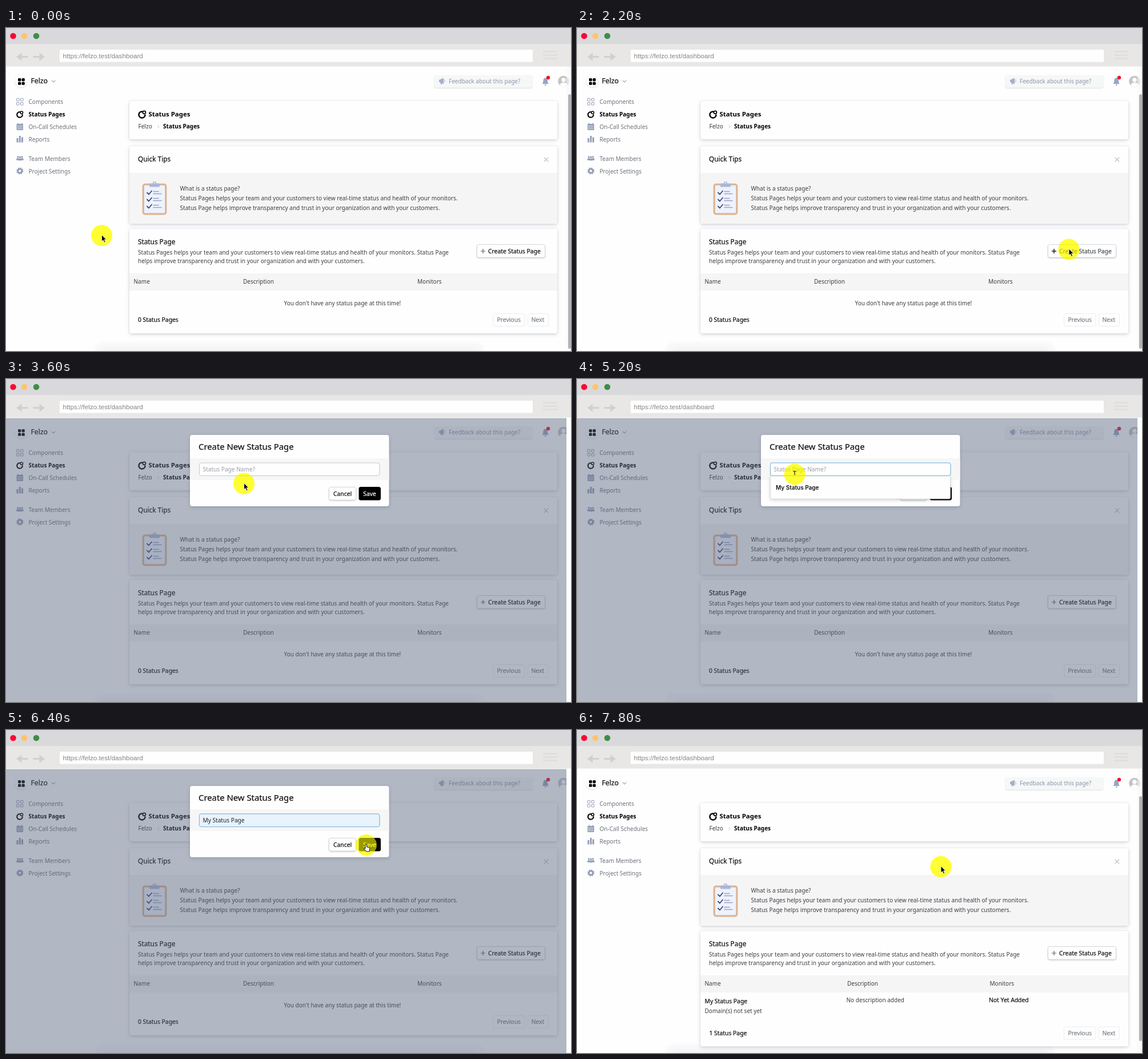
An HTML page for the animation above (8 s loop, 989 by 566 pixels).

```html
<!DOCTYPE html>
<html lang="en">
<head>
<meta charset="utf-8">
<title>Status pages</title>
<style>
html, body { margin: 0; width: 100%; height: 100%; overflow: hidden; background: #fefefe; }
svg { display: block; width: 100%; height: 100%; }
text { font: 10.04px "Noto Sans", sans-serif; fill: #3b3d44; white-space: pre; }
.side text { fill: #6c717c; }
.mid { font-size: 10.35px; color: #111; fill: currentColor; stroke: currentColor; stroke-width: .22; }
.bold, .side .bold { font-weight: 600; fill: #000; }
.head { font-size: 11.8px; }
.card { fill: #fefefe; filter: drop-shadow(0 2px 3px #3c425730) drop-shadow(0 0 1px #3c425720); }
.band { fill: #f5f5f5; }
.btn { fill: #fefefe; stroke: #d5d8df; filter: drop-shadow(0 1px 1px #0003); }
.pale { fill: #fefefe; stroke: #ebecef; }
.line { fill: none; stroke-linecap: round; stroke-linejoin: round; }
</style>
</head>
<body>
<svg viewBox="0 0 989 566">
  <defs>
    <g id="ring" class="line" stroke="#000">
      <path d="M0 -4.4A4.8 4.8 0 1 0 4.8 .8" stroke-width="2.2"/>
      <circle cx="3.4" cy="-3.2" r="2.2" stroke-width="1.5"/>
    </g>
    <g id="tick" class="line">
      <path d="M247 0l3 3 5-6" stroke="#3d4a70" stroke-width="1.8"/>
      <path d="M258-2h9M258 2h14" stroke="#98a4c4" stroke-width="1.6"/>
    </g>
    <g id="person"><circle cy="-2.6" r="1.7"/><path d="M-2.7 3.2V1.6Q-2.7-.4 0-.4T2.7 1.6V3.2z"/></g>
    <filter id="blur"><feGaussianBlur stdDeviation="2"/></filter>
  </defs>

  <rect width="989" height="566" fill="#fefefe"/>

  <!-- page -->
  <g filter="url(#blur)">
    <rect x="156" y="551" width="680" height="40" rx="14" fill="#f8f8fa"/>
    <rect x="168" y="560" width="656" height="30" rx="8" fill="#f4f4f4"/>
  </g>
  <circle cx="26.5" cy="93.5" r="10.5" fill="#fefefe" style="filter:drop-shadow(0 1px 1px #0002)"/>
  <rect x="21" y="88" width="5.3" height="5.3" rx="1.5"/><rect x="27.5" y="88" width="5.3" height="5.3" rx="1.5"/>
  <rect x="21" y="94.5" width="5.3" height="5.3" rx="1.5"/><rect x="27.5" y="94.5" width="5.3" height="5.3" rx="1.5"/>
  <text class="mid" x="43.5" y="97" style="font-size:12.2px">Felzo</text>
  <path class="line" d="M80 92l3 3 3-3" stroke="#6b7ba8"/>

  <rect x="750" y="83" width="171" height="21.5" rx="3" fill="#f6f7f7" style="filter:drop-shadow(0 1px 1px #0002)"/>
  <path d="M758 91l8-3.5v10.5l-8-3.5zM760 95h2.5l1 3.5h-2.5z" fill="#a3afca"/>
  <path class="line" d="M767.5 90.5q2 2.3 0 4.6" stroke="#a3afca"/>
  <text x="775" y="96.5" style="fill:#8b95a8">Feedback about this page?</text>
  <path d="M938.5 98q2-2 2-6 0-4.5 3.7-4.5t3.7 4.5q0 4 2 6zM942.5 99h3.5q-.4 2-1.75 2t-1.75-2z" fill="#97a5c1"/>
  <circle cx="949" cy="87" r="3.2" fill="#f5112b"/>
  <circle cx="976" cy="93.5" r="9.8" fill="#c3c4c5"/>
  <circle cx="976" cy="91" r="3.8" fill="#fefefe"/>
  <path d="M969 100.3q1.5-4.8 7-4.8t7 4.8q-3 3-7 3t-7-3z" fill="#fefefe"/>

  <g class="side" fill="#94a0b8">
    <g fill="none" stroke="#94a0b8">
      <rect x="18.5" y="123.5" width="4.5" height="4.5" rx=".5"/><rect x="25.5" y="123.5" width="4.5" height="4.5" rx=".5"/>
      <rect x="18.5" y="130.5" width="4.5" height="4.5" rx=".5"/><rect x="25.5" y="130.5" width="4.5" height="4.5" rx=".5"/>
    </g>
    <use href="#ring" x="24" y="151.5"/>
    <rect x="18.5" y="168" width="11.5" height="11" rx="1"/>
    <path d="M21 166.5v3M27.5 166.5v3" stroke="#94a0b8" stroke-width="1.5"/>
    <path d="M20 171.5h8.5M20 174h8.5M20 176.5h8.5" stroke="#fefefe" stroke-dasharray="1.5 1"/>
    <path d="M18.5 193h3v7.5h-3zM22.8 189h3v11.5h-3zM27 191.5h3v9h-3z"/>
    <use href="#person" x="20.8" y="228.5"/><use href="#person" x="28" y="228.5"/><use href="#person" x="24.4" y="229"/>
    <circle cx="24.3" cy="250.5" r="3.6" fill="none" stroke="#94a0b8" stroke-width="3"/>
    <circle cx="24.3" cy="250.5" r="5.3" fill="none" stroke="#94a0b8" stroke-width="1.6" stroke-dasharray="2.16 2"/>
    <text x="39.5" y="133">Components</text>
    <text x="39.5" y="155" class="bold">Status Pages</text>
    <text x="39.5" y="176.5">On-Call Schedules</text>
    <text x="39.5" y="198.5">Reports</text>
    <text x="39.5" y="232.5">Team Members</text>
    <text x="39.5" y="254.5">Project Settings</text>
  </g>

  <rect class="card" x="216" y="128" width="749" height="67" rx="3"/>
  <use href="#ring" transform="translate(238 151.5) scale(1.15)"/>
  <text class="bold" x="249.5" y="155" style="font-size:11.4px">Status Pages</text>
  <text x="231.5" y="176">Felzo</text>
  <path class="line" d="M265.5 170l2.5 2.7-2.5 2.7" stroke="#b8bcc5" stroke-width=".8"/>
  <text class="bold" x="275" y="176">Status Pages</text>

  <rect class="card" x="216" y="207" width="749" height="136" rx="3"/>
  <rect class="band" x="216" y="254" width="749" height="89"/>
  <text class="mid head" x="231" y="234">Quick Tips</text>
  <path class="line" d="M942 227l7 7M949 227l-7 7" stroke="#9298a5"/>
  <rect x="240.2" y="274.2" width="39.6" height="51.6" rx="3" fill="#eef2fd" stroke="#dcb594" stroke-width="3.2"/>
  <circle cx="260" cy="272" r="2.3" fill="none" stroke="#abb6d6" stroke-width="1.5"/>
  <rect x="251" y="272.5" width="18" height="6" rx="1.5" fill="#abb6d6"/>
  <use href="#tick" y="288.5"/><use href="#tick" y="300.5"/><use href="#tick" y="312.5"/>
  <text x="304.5" y="284.5">What is a status page?</text>
  <text x="304.5" y="301.5">Status Pages helps your team and your customers to view real-time status and health of your monitors.</text>
  <text x="304.5" y="318.5">Status Page helps improve transparency and trust in your organization and with your customers.</text>

  <rect id="list" class="card" x="216" y="352" width="749" height="183" rx="3"/>
  <text class="mid head" x="231" y="378.5">Status Page</text>
  <text x="231" y="396.5">Status Pages helps your team and your customers to view real-time status and health of your monitors. Status Page</text>
  <text x="231" y="412">helps improve transparency and trust in your organization and with your customers.</text>
  <rect class="btn" x="824.5" y="379.5" width="119" height="22.5" rx="3"/>
  <path id="plus" d="M831 391h8M835 387v8"/>
  <text id="create" class="mid" x="844" y="394.5">Create Status Page</text>
  <rect class="band" x="216" y="430" width="749" height="30"/>
  <text x="223.5" y="447.5">Name</text>
  <g id="empty">
    <text x="415" y="447.5">Description</text>
    <text x="720" y="447.5">Monitors</text>
    <text x="486.5" y="485.5">You don't have any status page at this time!</text>
    <text class="mid" x="231" y="515">0 Status Pages</text>
  </g>
  <g id="filled">
    <text x="473" y="447.5">Description</text>
    <text x="722.5" y="447.5">Monitors</text>
    <text class="mid" x="223.5" y="478.5">My Status Page</text>
    <text x="223.5" y="495.5">Domain(s) not set yet</text>
    <text x="471.5" y="477">No description added</text>
    <text class="mid" x="721" y="477">Not Yet Added</text>
    <text class="mid" x="231.5" y="534.5">1 Status Page</text>
  </g>
  <g id="pager">
    <rect class="pale" x="852.5" y="500.5" width="55.5" height="22" rx="3"/>
    <rect class="pale" x="913.5" y="500.5" width="36" height="22" rx="3"/>
    <text class="mid" x="859.5" y="515" style="color:#7d818a">Previous</text>
    <text class="mid" x="919.5" y="515" style="color:#7d818a">Next</text>
  </g>
  <g id="scroll">
    <rect x="981" y="68" width="8" height="498" fill="#f8f8f8" opacity=".6"/>
    <rect id="thumb" x="984" y="116" width="5" rx="2.5" fill="#b3b3b3"/>
  </g>

  <!-- dialog -->
  <g id="modal">
    <rect x="981" y="68" width="8" height="498" fill="#fefefe"/>
    <rect y="68.5" width="981" height="497.5" fill="#55637c" opacity=".46"/>
    <rect class="card" x="322" y="98" width="348.5" height="125" rx="4"/>
    <rect x="322" y="139" width="348.5" height="38" fill="#f6f6f6"/>
    <text class="mid" x="337" y="124" style="font-size:14.85px">Create New Status Page</text>
    <rect id="glow" x="337.7" y="146.2" width="317" height="24.1" rx="4.3" fill="#b9dcf5"/>
    <rect id="field" x="338.5" y="147" width="315.4" height="22.5" rx="3.5"/>
    <text id="hint" x="344.5" y="162" style="fill:#9a9ea8;font-size:10.15px">Status Page Name?</text>
    <text id="name" x="344.5" y="162" style="fill:#222;font-size:10.15px">My Status Page</text>
    <rect id="caret" y="153" width="1" height="12.5"/>
    <g id="cancel">
      <rect class="btn" x="565.5" y="189.5" width="47" height="22.5" rx="3.5"/>
      <text id="cancelText" class="mid" x="573" y="204.5">Cancel</text>
    </g>
    <rect id="save" y="189" height="23.5" rx="3.5"/>
    <text id="saveText" class="mid" x="625.3" y="204.5">Save</text>
    <path id="spin" class="line" d="M-5 1A5 5 0 0 1 5 1" stroke="#e8e8ee" stroke-width="1.2"/>
    <g id="menu">
      <rect class="card" x="338.5" y="170" width="315" height="40" rx="2" stroke="#d4d4d4" stroke-width=".6"/>
      <rect id="pick" x="339" y="178" width="314" height="24" fill="#eee"/>
      <text x="348" y="193.5" style="font:600 10px Inter,sans-serif;fill:#111">My Status Page</text>
    </g>
  </g>

  <!-- browser frame -->
  <rect width="989" height="28" fill="#d9d9dc"/>
  <rect y="28" width="989" height="39.5" fill="#e8e7e5"/>
  <circle cx="12.5" cy="14" r="5.3" fill="#fb0633"/>
  <circle cx="32" cy="14" r="5.3" fill="#fdc46c"/>
  <circle cx="53" cy="14" r="5.3" fill="#3c8e45"/>
  <path d="M18 50.5l9.5-7v5.5h11v3h-11v5.5zM68 50.5l-9.5-7v5.5h-11v3h11v5.5z" fill="#d1d0ce"/>
  <rect x="94" y="38" width="828" height="21.5" fill="#fefefe"/>
  <text x="99.5" y="53" style="font:11.7px 'Liberation Sans',Arial,sans-serif;fill:#858585">https://felzo.test/dashboard</text>
  <path d="M940 41.5h25M940 47.5h25M940 53.5h25" stroke="#dcdbd9" stroke-width="2"/>

  <!-- pointer: the spot tints what lies below, then covers it -->
  <circle id="tint" r="18.5" fill="#ff0" opacity=".5" style="mix-blend-mode:multiply"/>
  <g id="cursor">
    <circle r="18.5" fill="#ff0" opacity=".6"/>
    <path id="arrow" d="M0-1v11.5l2.6-2.4 1.9 4.3 2-.9-1.9-4.2h3.5z" stroke="#fff" stroke-width=".8"/>
    <path id="beam" class="line" d="M-2.5-5.5q2.5 0 2.5 1.5 0-1.5 2.5-1.5M0-4v5" stroke="#222" stroke-width="1.2"/>
    <path id="hand" d="M-1.5 0q0-1.3 1.2-1.3T1 0v3.5l4 .8q1.3.4 1.3 1.8l-.8 5.4h-5l-4-4.5q-.6-1.3.6-1.5l1.4.8z" fill="#fff" stroke="#111"/>
  </g>
</svg>
<script>
const $ = id => document.getElementById(id);
const set = (id, attrs) => { for (const k in attrs) $(id).setAttribute(k, attrs[k]); };
const show = (id, on) => { $(id).style.display = on ? "" : "none"; };
const tone = (id, color) => { $(id).style.color = color; };

const LOOP = 8000, STEP = 200;
// begin, end, x, y of each pointer move
const moves = [
  [800, 1800, 861, 388], [2600, 3800, 381, 167], [5200, 5600, 388, 186],
  [5800, 6400, 630.5, 201.5], [6400, 6600, 632, 201.5],
  [7000, 7600, 641, 208], [7600, 7800, 637, 239.5]
];
const ease = p => p * p * (3 - 2 * p);

function pointer(t) {
  let x = 167.5, y = 363.5;
  for (const [from, to, tx, ty] of moves) {
    const p = ease(Math.min(1, Math.max(0, (t - from) / (to - from))));
    x += (tx - x) * p;
    y += (ty - y) * p;
  }
  return [x, y];
}

function draw(now) {
  const t = Math.floor(now % LOOP / STEP) * STEP;
  const within = (a, b) => t >= a && t < b;
  const done = t >= 7800, saving = within(7200, 7800);
  const named = t >= 5600, focus = within(3800, 7200), hover = within(1800, 2400);

  show("modal", within(2400, 7800));
  show("scroll", !within(2400, 7800));
  show("empty", !done);
  show("filled", done);
  set("list", { height: done ? 202.5 : 183 });
  set("pager", { transform: `translate(0 ${done ? 19.5 : 0})` });
  set("thumb", { height: done ? 429 : 446 });
  tone("create", hover ? "#4c5058" : "#111");
  set("plus", { stroke: hover ? "#223" : "#566", "stroke-width": hover ? 1.6 : 1.2 });

  show("glow", focus);
  set("field", { fill: named ? "#e8f3fc" : "#fefefe", stroke: focus ? "#83b5d8" : "#c3c8d0" });
  show("hint", !named);
  show("name", named);
  show("caret", within(3800, 4200) || within(4600, 5200) || within(6000, 6400) || within(6800, 7200));
  set("caret", { x: named ? 418 : 344.5 });
  show("menu", within(5200, 6000));
  show("pick", named);

  set("cancel", { transform: `translate(${saving ? -15.5 : 0} 0)` });
  tone("cancelText", saving ? "#8b93a6" : "#111");
  set("save", { x: saving ? 602.5 : 617.5, width: saving ? 53.5 : 38.5 });
  tone("saveText", saving ? "#a5a7b5" : "#fff");
  show("spin", saving);
  set("spin", { transform: `translate(615 201) rotate(${(t - 7600) * 0.5})` });

  const beam = within(3800, 5400), hand = within(6400, 7200);
  const [x, y] = pointer(t);
  set("tint", { cx: x, cy: y });
  set("cursor", { transform: `translate(${x} ${y})` });
  show("beam", beam);
  show("hand", hand);
  show("arrow", !beam && !hand);
  requestAnimationFrame(() => draw(performance.now() - start));
}
const start = performance.now();
draw(0);
</script>
</body>
</html>
```
